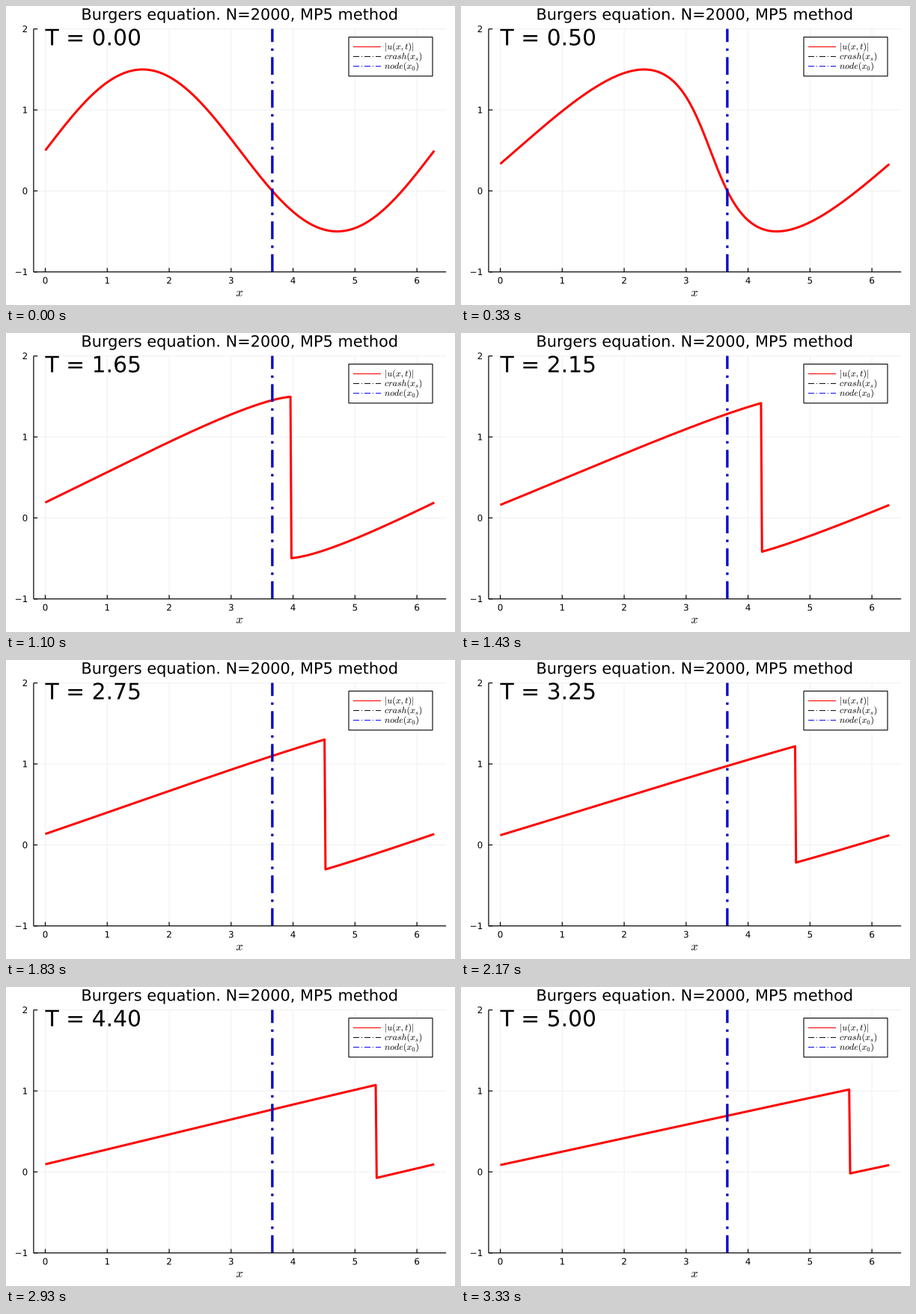
Animation, 600 px wide and 400 px high, one loop 3.36 s. Source, as a matplotlib script:

```python
import numpy as np
import matplotlib.pyplot as plt
from matplotlib.animation import FuncAnimation
from matplotlib.patches import PathPatch, Rectangle
from matplotlib.textpath import TextPath

W, H = 600, 400
LOOP_MS, TICK_MS = 3360, 10
DT = 0.05
PT = 0.72  # points per pixel at 100 dpi
DASHDOT = (0, (8, 3, 1, 3))

plt.rcParams["font.family"] = "DejaVu Sans"
plt.rcParams["mathtext.fontset"] = "cm"

fig = plt.figure(figsize=(W / 100, H / 100), dpi=100, facecolor="white")
ax = fig.add_axes([0, 0, 1, 1])
ax.set_xlim(0, W)
ax.set_ylim(0, H)
ax.axis("off")


def px(x):
    return 52.5 + 82.77 * x


def py(u):
    return 152.6 + 108.33 * u


def line(xs, ys, color="black", width=1.0, style="-", **kw):
    return ax.plot(xs, ys, color=color, lw=width * PT, ls=style, snap=False,
                   solid_capstyle="butt", dash_capstyle="butt",
                   solid_joinstyle="round", **kw)[0]


def glyphs(x, top, s, size):
    """Outline of s with its pen origin at x and its baseline at top."""
    return TextPath((x, H - top), s, size=size)


def text(x, top, s, size, z=5):
    patch = PathPatch(glyphs(x, top, s, size), fc="black", lw=0,
                      snap=False, zorder=z)
    return ax.add_patch(patch)


LEFT, RIGHT = px(-0.06 * np.pi), px(2.06 * np.pi)
BOTTOM, TOP = py(-1), py(2)
DIGIT = 0.636  # digit advance in em
TICK_SIZE = 11.9

# grid, ticks and tick labels
for n in range(7):
    x = px(n)
    line([x, x], [BOTTOM, TOP], "#f0f0f0", zorder=1)
    line([x, x], [BOTTOM, BOTTOM + 5.3], width=1.2, zorder=4)
    text(x - DIGIT * TICK_SIZE / 2, 371.4, str(n), TICK_SIZE)
for n in range(-1, 3):
    y = py(n)
    line([LEFT, RIGHT], [y, y], "#f0f0f0", zorder=1)
    line([LEFT, LEFT + 5.3], [y, y], width=1.2, zorder=4)
    label = str(n).replace("-", "\u2212")
    advance = DIGIT + (0.838 if n < 0 else 0)
    text(29.2 - advance * TICK_SIZE, H - y + 4.3, label, TICK_SIZE)
line([LEFT, RIGHT], [BOTTOM, BOTTOM], width=1.2, zorder=4)
line([LEFT, LEFT], [BOTTOM, TOP], width=1.2, zorder=4)

text(100.4, 18.4, "Burgers equation. N=2000, MP5 method", 20.86)
text(307.4, 388.3, "$x$", 16.4)
clock = text(52.5, 52.5, "T = 0.00", 29.8)

# solution curve and the two coinciding markers
curve = line([], [], "red", 3, zorder=2)
node = px(7 * np.pi / 6)
line([node, node], [BOTTOM, TOP], "black", 2.93, DASHDOT, zorder=3)
line([node, node], [BOTTOM, TOP], "blue", 2.93, DASHDOT, zorder=3, alpha=0.85)

# legend
ax.add_patch(Rectangle((458, H - 93.8), 112, 52.2, fc="white", ec="black",
                       lw=1.1 * PT, snap=False, zorder=6))
entries = [("red", "-", "$|u(x,t)|$"),
           ("black", DASHDOT, "$crash(x_s)$"),
           ("blue", DASHDOT, "$node(x_0)$")]
for row, (color, style, label) in enumerate(entries):
    y = 54.6 + 13 * row
    line([464, 501], [H - y, H - y], color, 1.1 if style == "-" else 1.0,
         style, zorder=7)
    text(506, y + 3.4, label, 12, z=7)

X = np.linspace(0, 2 * np.pi, 2000, endpoint=False)


def solve(t):
    """Exact entropy solution for u(x, 0) = 0.5 + sin x, by characteristics."""
    y = (X - 0.5 * t + np.pi) % (2 * np.pi) - np.pi
    keep = np.abs(y) < np.pi - 0.006
    x, y = X[keep], y[keep]
    lo = np.zeros_like(y)
    hi = np.full_like(y, np.arccos(-1 / t) if t > 1 else np.pi)
    for _ in range(36):
        mid = (lo + hi) / 2
        low = mid + t * np.sin(mid) < np.abs(y)
        lo = np.where(low, mid, lo)
        hi = np.where(low, hi, mid)
    return x, 0.5 + np.sign(y) * np.sin(lo)


def update(tick):
    t = (3 * tick + 1) // 10 * DT
    x, u = solve(t)
    curve.set_data(px(x), py(u))
    clock.set_path(glyphs(52.5, 52.5, f"T = {t:.2f}", 29.8))
    return curve, clock


anim = FuncAnimation(fig, update, frames=LOOP_MS // TICK_MS, interval=TICK_MS,
                     init_func=lambda: update(0), repeat=True, repeat_delay=0)
plt.show()
```
